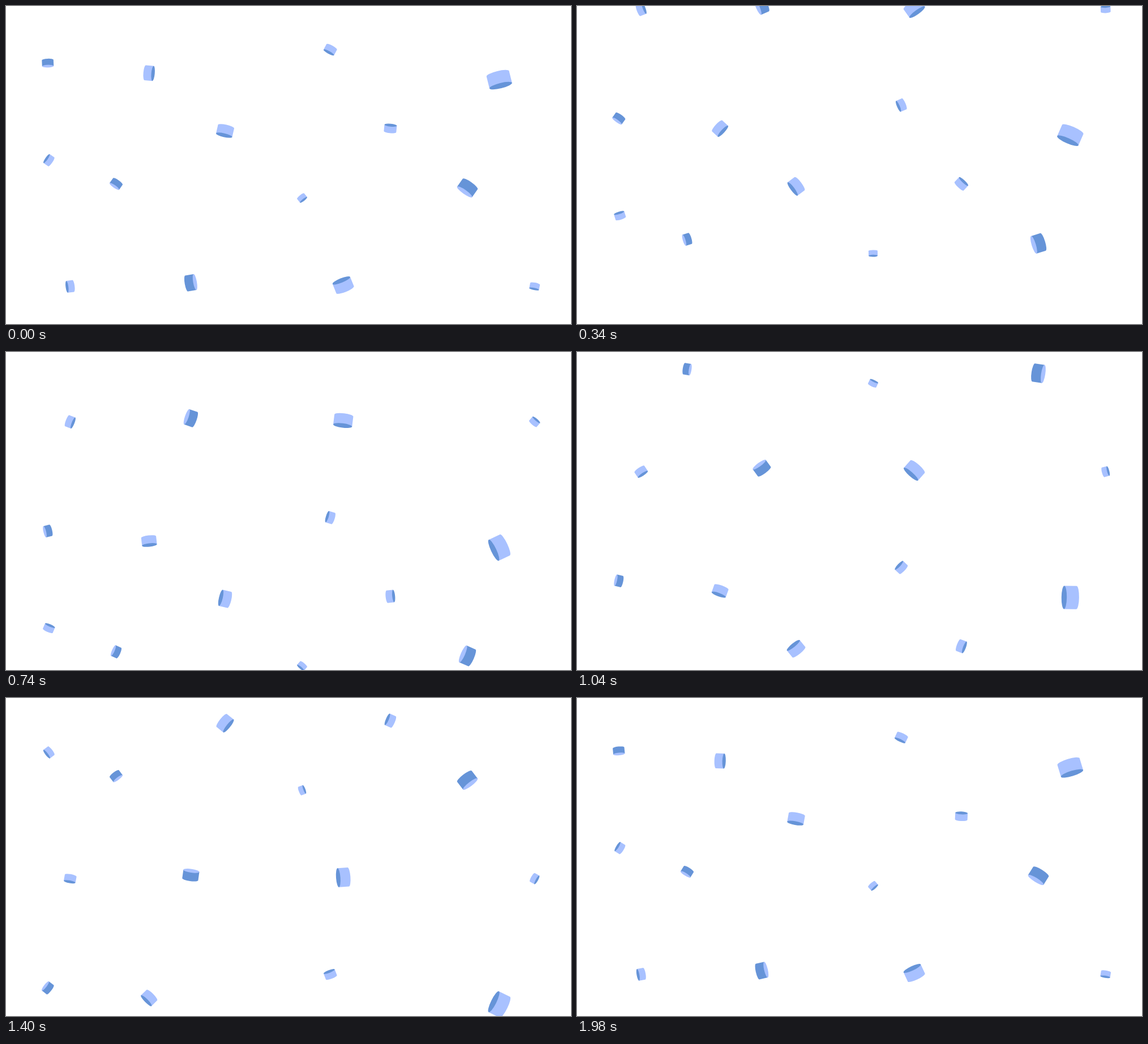
These frames come from a looping animation (998 px wide and 561 px high, 2000 ms). An HTML page with a canvas:

```html
<!DOCTYPE html>
<html lang="en">
<head>
<meta charset="utf-8">
<title>Falling discs</title>
<style>
  html, body { margin: 0; width: 100%; height: 100%; overflow: hidden; background: #fff; }
  canvas { display: block; }
</style>
</head>
<body>
<canvas id="stage" width="998" height="561"></canvas>
<script>
const ctx = document.getElementById('stage').getContext('2d');
const LIGHT = '#a8c1ff', DARK = '#6694d8';
const LOOP = 2000, FRAME = 20;
const STEPS = 240;        // motion ticks per loop
const FALL = 586.6;       // pixels fallen per loop

const disc = (x, y, size, angle, look = {}) =>
  ({ x, y, size, angle, body: LIGHT, cap: DARK, curl: 0, ...look });
const dark = { body: DARK, cap: LIGHT };

// place, diameter and cap direction in degrees at the loop's start
const discs = [
  disc(73.8, 100.7, 20.5, 87.5, dark),
  disc(252.7, 118.4, 26.5, 5),
  disc(572.8, 77, 21, 118.5),
  disc(871.3, 130, 41, 76),
  disc(387, 220.4, 29.2, 103, { curl: 0.0015 }),
  disc(678.9, 216, 22, 275.5),
  disc(75.8, 272, 19, 214.5),
  disc(194.5, 313.8, 20.5, 125, dark),
  disc(523, 338.7, 16, 51.5),
  disc(815, 321, 32.3, 125, dark),
  disc(113.3, 494.7, 21, 172.5),
  disc(326.4, 488.3, 28.4, 350, dark),
  disc(595.7, 492.4, 33.5, 248),
  disc(933.7, 494.6, 17.5, 101.5)
];

// degrees turned: about one per tick, easing off towards the bottom
const turnAt = tick => tick * (1.004 - 3.3e-6 * (tick + 95) ** 2);

function drawDisc({ x, y, size, angle, body, cap, curl }, tick) {
  const half = size * 0.265, rx = size * 0.115, ry = size / 2;
  ctx.save();
  ctx.translate(x, y + FALL * tick / STEPS);
  ctx.rotate((angle + turnAt(tick) + curl * tick * tick) * Math.PI / 180);

  ctx.fillStyle = body;
  ctx.beginPath();
  ctx.moveTo(half, ry);
  ctx.lineTo(-half, ry);
  ctx.ellipse(-half, 0, rx, ry, 0, Math.PI / 2, Math.PI * 1.5);
  ctx.lineTo(half, -ry);
  ctx.fill();

  ctx.fillStyle = cap;
  ctx.beginPath();
  ctx.ellipse(half, 0, rx, ry, 0, 0, Math.PI * 2);
  ctx.fill();
  ctx.restore();
}

function draw() {
  const frame = Math.floor(((performance.now() + 0.5) % LOOP) / FRAME);
  const tick = Math.floor(frame * STEPS * FRAME / LOOP);
  ctx.clearRect(0, 0, 998, 561);
  for (const d of discs) {
    drawDisc(d, tick);
    drawDisc(d, tick - STEPS);   // the copy that follows from above
  }
  requestAnimationFrame(draw);
}
draw();
</script>
</body>
</html>
```
